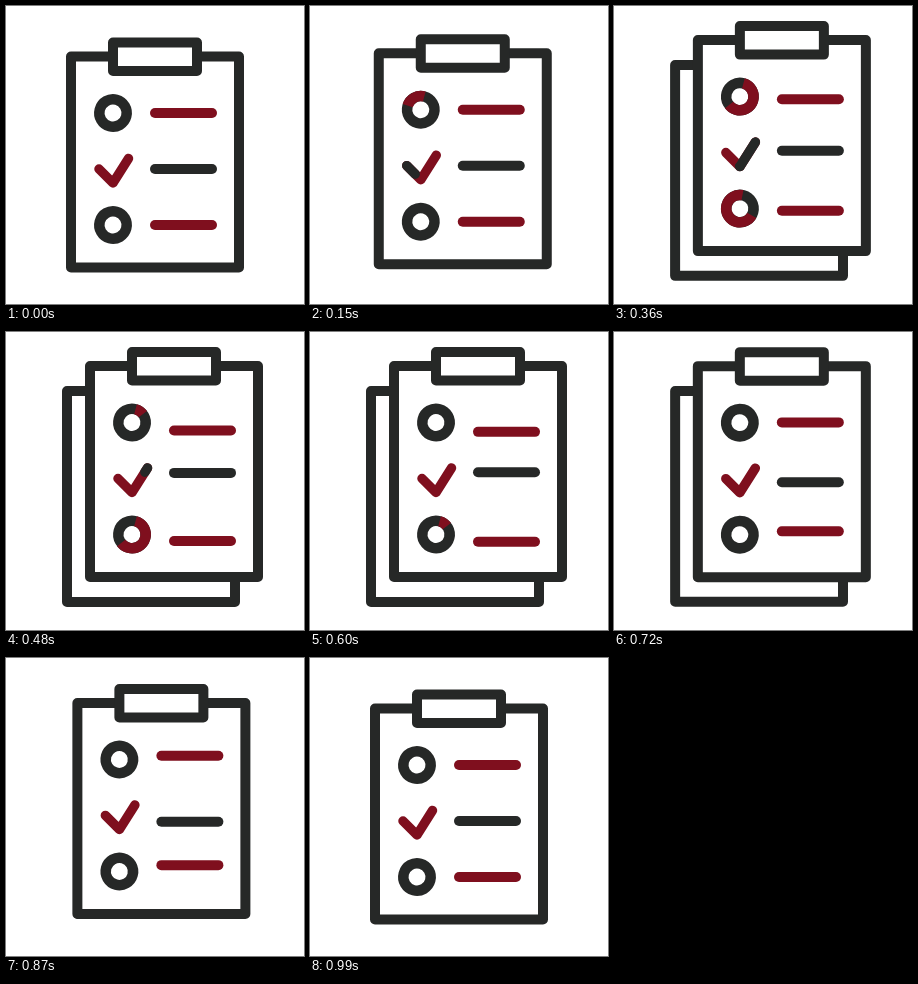
An HTML page with a canvas for the animation above (1.11 s loop, 298x298 px).

```html
<!DOCTYPE html>
<html lang="en">
<head>
<meta charset="utf-8">
<title>Checklist</title>
<style>
  html, body { margin: 0; width: 100%; height: 100%; overflow: hidden; background: #fff; }
  canvas { display: block; width: 298px; height: 298px; }
</style>
</head>
<body>
<canvas id="stage" width="298" height="298"></canvas>
<script>
const ctx = document.getElementById('stage').getContext('2d');
const DARK = '#262827', RED = '#7f0f1e';
const LOOP = 1110, STEP = 30;
const TICK = [[93, 163], [107, 177], [122.5, 152.5]];
const TICK_LENGTH = 49;

// Eased progress from 0 to 1 between two times
function ease(t, from, to) {
  const u = Math.min(1, Math.max(0, (t - from) / (to - from)));
  return u * u * (3 - 2 * u);
}

function box(x, y, w, h) {
  ctx.beginPath();
  ctx.rect(x, y, w, h);
  ctx.fill();
  ctx.stroke();
}

function polyline(points, color) {
  ctx.strokeStyle = color;
  ctx.beginPath();
  points.forEach(p => ctx.lineTo(...p));
  ctx.stroke();
}

// Visible part of the second colour, as fractions of the path
const sweep = t => [ease(t, 220, 545), ease(t, 60, 340)];

function ring(y, t) {
  const [tail, head] = sweep(t);
  const angle = f => -Math.PI / 2 + 0.26 - f * 2 * Math.PI;
  const arc = (a, b, color) => {
    ctx.strokeStyle = color;
    ctx.beginPath();
    ctx.arc(107, y, 13.7, angle(a), angle(b), true);
    ctx.stroke();
  };
  ctx.lineCap = 'butt';
  ctx.lineWidth = 10.5;
  arc(0, 1, DARK);
  if (head > tail) arc(tail, head, RED);
  ctx.lineCap = 'round';
}

function tick(t) {
  const [tail, head] = sweep(t);
  ctx.lineWidth = 9.5;
  polyline(TICK, RED);
  if (head <= tail) return;
  ctx.setLineDash([(head - tail) * TICK_LENGTH, 2 * TICK_LENGTH]);
  ctx.lineDashOffset = -tail * TICK_LENGTH;
  polyline(TICK, DARK);
  ctx.setLineDash([]);
}

// Bar that swings by `first`, then by `second`, then settles
function bar(y, color, first, second, t) {
  const dy = first * ease(t, 255, 570)
    + (second - first) * ease(t, 570, 810)
    - second * ease(t, 810, 990);
  ctx.lineWidth = 10;
  polyline([[149, y + dy], [206, y + dy]], color);
}

function draw(t) {
  const lift = ease(t, 60, 375) - ease(t, 705, 975);
  const size = 0.9 + 0.1 * lift;
  ctx.fillStyle = '#fff';
  ctx.fillRect(0, 0, 298, 298);
  ctx.lineJoin = ctx.lineCap = 'round';
  ctx.lineWidth = 10;
  ctx.strokeStyle = DARK;
  box(229 - 168 * size, 59, 168 * size, 211 * size);

  ctx.save();
  ctx.translate(19 * lift, -16.5 * lift);
  box(65, 50.5, 168, 211);
  box(107, 36.5, 84, 28.5);
  ring(107, t);
  tick(t);
  ring(219, t - 120);
  bar(107, RED, 10, -5, t);
  bar(163, DARK, -7, 8.5, t);
  bar(219, RED, 8, -8.5, t);
  ctx.restore();
}

function frame() {
  const t = performance.now() % LOOP;
  draw(Math.floor(t / STEP) * STEP);
  requestAnimationFrame(frame);
}
frame();
</script>
</body>
</html>
```
